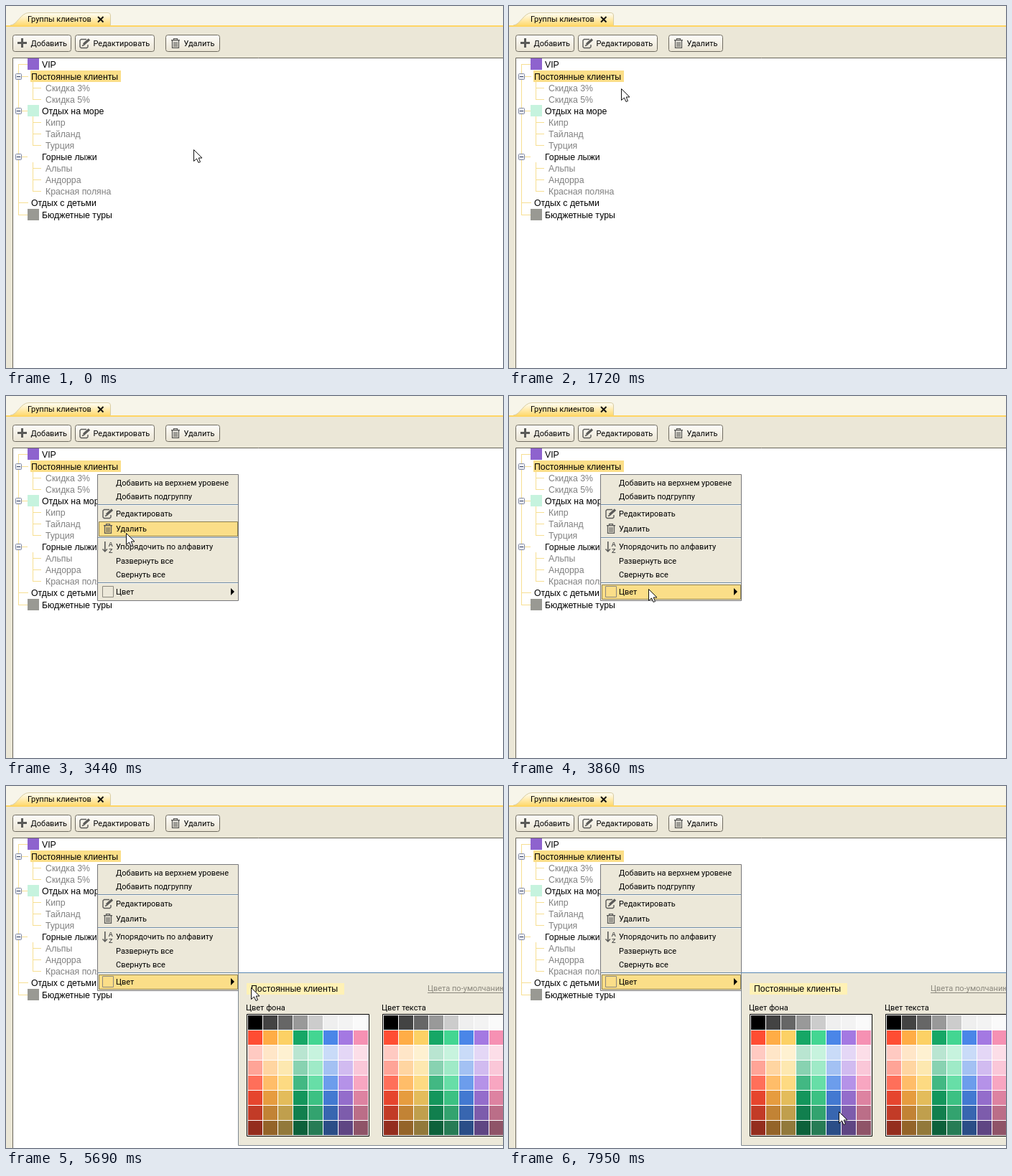
Animation of 692 by 505 pixels, one loop 8000 ms. Source, as an HTML page with a canvas:

```html
<!DOCTYPE html>
<html lang="ru">
<head>
<meta charset="utf-8">
<title>Группы клиентов</title>
<style>
html, body { margin: 0; width: 100%; height: 100%; overflow: hidden; }
canvas { display: block; }
</style>
</head>
<body>
<canvas id="stage" width="692" height="505"></canvas>
<script>
const c = document.getElementById('stage').getContext('2d');
const UI = '11px Roboto, "Open Sans", sans-serif';
const TREE = '12.3px "Liberation Sans", Arial, sans-serif';
const BEIGE = '#ece8d9', YELLOW = '#fbde88', BRANCH = '#f7df92', ICON = '#5a5a58', MUTED = '#8b887e';

const GRAYS = ['#000', '#434343', '#666', '#999', '#ccc', '#efefef', '#f3f3f3', '#fafafa'];
const HUES = ['#ff4d33', '#ffad46', '#fcd165', '#16a766', '#43d692', '#4a86e8', '#a479e2', '#f691b3'];
// share of white (positive) or black (negative) in each palette row
const SHADES = [0, 0.7, 0.49, 0.19, -0.1, -0.24, -0.42];

const GROUPS = [
  { label: 'VIP', color: '#8e63ce' },
  { label: 'Постоянные клиенты', selected: true, children: ['Скидка 3%', 'Скидка 5%'] },
  { label: 'Отдых на море', color: '#c6f3de', children: ['Кипр', 'Тайланд', 'Турция'] },
  { label: 'Горные лыжи', color: '#fff', children: ['Альпы', 'Андорра', 'Красная поляна'] },
  { label: 'Отдых с детьми' },
  { label: 'Бюджетные туры', color: '#999993' }
];

const MENU = [
  { label: 'Добавить на верхнем уровене', y: 121 },
  { label: 'Добавить подгруппу', y: 140 },
  { label: 'Редактировать', y: 164, icon: editIcon },
  { label: 'Удалить', y: 185, icon: trashIcon },
  { label: 'Упорядочить по алфавиту', y: 210, icon: sortIcon },
  { label: 'Развернуть все', y: 230 },
  { label: 'Свернуть все', y: 249 },
  { label: 'Цвет', y: 273 }
];
const COLOR_ITEM = MENU[MENU.length - 1];
const MENU_AT = 2330, PALETTE_AT = 4010;

// path holds Bezier points; power above 1 slows down, below 1 speeds up
const MOVES = [
  { start: 500, end: 1420, steps: 7, power: 0.7, path: [[261, 200], [193, 148]] },
  { start: 1560, end: 2030, steps: 4, power: 1.5, path: [[193, 148], [135, 97]] },
  { start: 3190, end: 3860, steps: 6, power: 1.15, path: [[135, 97], [194, 269]] },
  { start: 5250, end: 6150, steps: 7, power: 1, path: [[194, 269], [332, 240], [438, 350]] },
  { start: 6600, end: 7510, steps: 7, power: 1, path: [[438, 350], [385, 305], [500, 490], [442, 425]] },
  { start: 7660, end: 7950, steps: 3, power: 1, path: [[442, 425], [459, 454]] }
];

const mix = (a, b, f) => a + (b - a) * f;

function bezier(points, u) {
  if (points.length === 1) return points[0];
  return bezier(points.slice(1).map(([x, y], i) =>
    [mix(points[i][0], x, u), mix(points[i][1], y, u)]), u);
}

function pointerAt(time) {
  const move = MOVES.findLast(m => time >= m.start);
  if (!move) return MOVES[0].path[0];
  const { start, end, steps, power, path } = move;
  const step = Math.min(steps, Math.floor((time - start) / (end - start) * (steps - 1) + 1.2));
  return bezier(path, 1 - (1 - step / steps) ** power).map(Math.round);
}

function shade(hex, amount) {
  const goal = amount > 0 ? 255 : 0;
  const parts = hex.match(/\w\w/g).map(p => Math.round(mix(parseInt(p, 16), goal, Math.abs(amount))));
  return `rgb(${parts})`;
}
const PALETTE = [GRAYS, ...SHADES.map(amount => HUES.map(hue => shade(hue, amount)))];

function rect(x, y, w, h, fill) {
  c.fillStyle = fill;
  c.fillRect(x, y, w, h);
}

function frame(x, y, w, h, fill, stroke, radius = 0) {
  c.beginPath();
  c.roundRect(x + 0.5, y + 0.5, w - 1, h - 1, radius);
  c.fillStyle = fill;
  c.fill();
  c.strokeStyle = stroke;
  c.lineWidth = 1;
  c.stroke();
}

function text(str, x, y, font = UI, color = '#000') {
  c.font = font;
  c.fillStyle = color;
  c.fillText(str, x, y);
}

function line(points, color, width = 1) {
  c.beginPath();
  points.forEach(p => c.lineTo(...p));
  c.strokeStyle = color;
  c.lineWidth = width;
  c.stroke();
}

function gradient(y0, y1, from, to) {
  const g = c.createLinearGradient(0, y0, 0, y1);
  g.addColorStop(0, from);
  g.addColorStop(1, to);
  return g;
}

function at(x, y, draw) {
  c.save();
  c.translate(x, y);
  draw();
  c.restore();
}

function plusIcon() {
  rect(6, 0, 3, 13, ICON);
  rect(1, 5, 13, 3, ICON);
}

function editIcon() {
  line([[10, 1.5], [2.5, 1.5], [1, 3], [1, 12], [2.5, 13.5], [10.5, 13.5], [12, 12], [12, 9]], ICON, 1.4);
  line([[6, 8.5], [14, 1.5]], ICON, 3.4);
  line([[4, 10.5], [7, 9]], ICON, 1.6);
}

function trashIcon() {
  rect(2, 2, 12, 1.4, ICON);
  line([[5.5, 2], [5.5, 0.6], [10.5, 0.6], [10.5, 2]], ICON, 1.2);
  line([[3.5, 3], [3.5, 13.4], [12.5, 13.4], [12.5, 3]], ICON, 1.3);
  for (const x of [5.5, 7.5, 9.5]) rect(x, 5, 1.1, 7, ICON);
}

function sortIcon() {
  rect(3, 0, 1.6, 13, ICON);
  line([[0.5, 10.5], [3.8, 14], [7, 10.5]], ICON, 1.5);
  const font = 'bold 9px "Liberation Sans", sans-serif';
  text('A', 8.5, 6.5, font, ICON);
  text('Z', 9, 15.5, font, ICON);
}

function button(x, w, label, icon) {
  frame(x, 40, w, 24, gradient(40, 64, '#fffefb', '#e9e3d2'), '#6f6b60', 3);
  at(x + 6, 45, icon);
  text(label, x + 25.5, 56);
}

function drawHeader() {
  rect(0, 0, 692, 505, '#ebe7d7');
  rect(0, 0, 692, 27, '#f7f5ea');
  c.beginPath();
  c.moveTo(6, 27);
  c.bezierCurveTo(16, 26, 20, 9.5, 32, 9.5);
  c.lineTo(142, 9.5);
  c.quadraticCurveTo(145.5, 9.5, 145.5, 13);
  c.lineTo(145.5, 27);
  c.fillStyle = gradient(10, 27, '#fffdf3', '#ffda70');
  c.fill();
  c.strokeStyle = '#d8cda4';
  c.lineWidth = 1;
  c.stroke();
  rect(0, 27, 692, 2, '#ffd564');
  text('Группы клиентов', 30, 22);
  line([[128, 15], [135.5, 22.5]], '#111', 2);
  line([[135.5, 15], [128, 22.5]], '#111', 2);
  button(9, 82, 'Добавить', plusIcon);
  button(96, 111, 'Редактировать', editIcon);
  button(222, 76, 'Удалить', trashIcon);
}

function drawTree() {
  frame(9, 72, 700, 450, '#fff', '#68655a');
  rect(17, 81, 1, 211, BRANCH);
  let row = 0;
  const nextY = () => Math.round(81.48 + 16.08 * row++);
  for (const { label, color, selected, children = [] } of GROUPS) {
    const y = nextY();
    rect(17, y, 14, 1, BRANCH);
    if (selected) rect(34, 90, 126, 16, YELLOW);
    if (color) rect(30, y - 8, 16, 16, color);
    text(label, color ? 50 : 35, y + 5, TREE);
    for (const child of children) {
      const childY = nextY();
      rect(37, y + 8, 1, childY - y - 7, BRANCH);
      rect(37, childY, 12, 1, BRANCH);
      text(child, 55, childY + 5, TREE, '#808080');
    }
    if (children.length) {
      frame(13, y - 4, 9, 9, gradient(y - 4, y + 5, '#fff', '#dcdfe8'), '#8189a2', 1);
      rect(15, y, 5, 1, '#333f63');
    }
  }
}

function drawMenu(hoverY) {
  frame(127, 109, 197, 177, BEIGE, '#77777a');
  for (const y of [151, 197, 260]) {
    rect(128, y, 195, 1, '#6f8ba6');
    rect(128, y + 1, 195, 1, '#fbfaf5');
  }
  const hovered = MENU.find(item => Math.abs(hoverY - item.y) <= 10);
  if (hovered) frame(129, hovered.y - 10, 194, 21, YELLOW, '#8d8050');
  for (const { label, y, icon } of MENU) {
    text(label, 153, y + 4);
    if (icon) at(134, y - 7, icon);
  }
  frame(134, 265, 16, 16, hovered === COLOR_ITEM ? YELLOW : BEIGE, MUTED);
  c.beginPath();
  c.moveTo(313, 268);
  c.lineTo(318, 273);
  c.lineTo(313, 278);
  c.fillStyle = '#000';
  c.fill();
}

function drawGrid(x, label) {
  text(label, x - 1, 313);
  frame(x, 318, 171, 171, '#fff', '#000');
  PALETTE.forEach((row, j) => row.forEach((color, i) =>
    rect(x + 2 + i * 21, 320 + j * 21, 20, 20, color)));
}

function drawPalette() {
  frame(323, 260, 400, 242, BEIGE, '#7d8791');
  rect(323, 260, 369, 1, '#5a88b3');
  rect(335, 275, 136, 16, '#fff1b5');
  text('Постоянные клиенты', 341, 287, TREE);
  text('Цвета по-умолчанию', 587, 286, UI, MUTED);
  rect(587, 288, 105, 1, MUTED);
  drawGrid(335, 'Цвет фона');
  drawGrid(524, 'Цвет текста');
}

function drawPointer([x, y]) {
  at(x + 0.5, y + 0.5, () => {
    c.beginPath();
    [[0, 0], [0, 16], [4, 12.5], [6.5, 18], [9, 17], [6.7, 11.5], [11.5, 11.5]]
      .forEach(p => c.lineTo(...p));
    c.closePath();
    c.fillStyle = '#fff';
    c.fill();
    c.strokeStyle = '#111';
    c.lineWidth = 1;
    c.stroke();
  });
}

function render() {
  const time = performance.now() % 8000;
  const pointer = pointerAt(time);
  drawHeader();
  drawTree();
  if (time >= MENU_AT) drawMenu(time < PALETTE_AT ? pointer[1] : COLOR_ITEM.y);
  if (time >= PALETTE_AT) drawPalette();
  drawPointer(pointer);
  requestAnimationFrame(render);
}
render();
</script>
</body>
</html>
```
